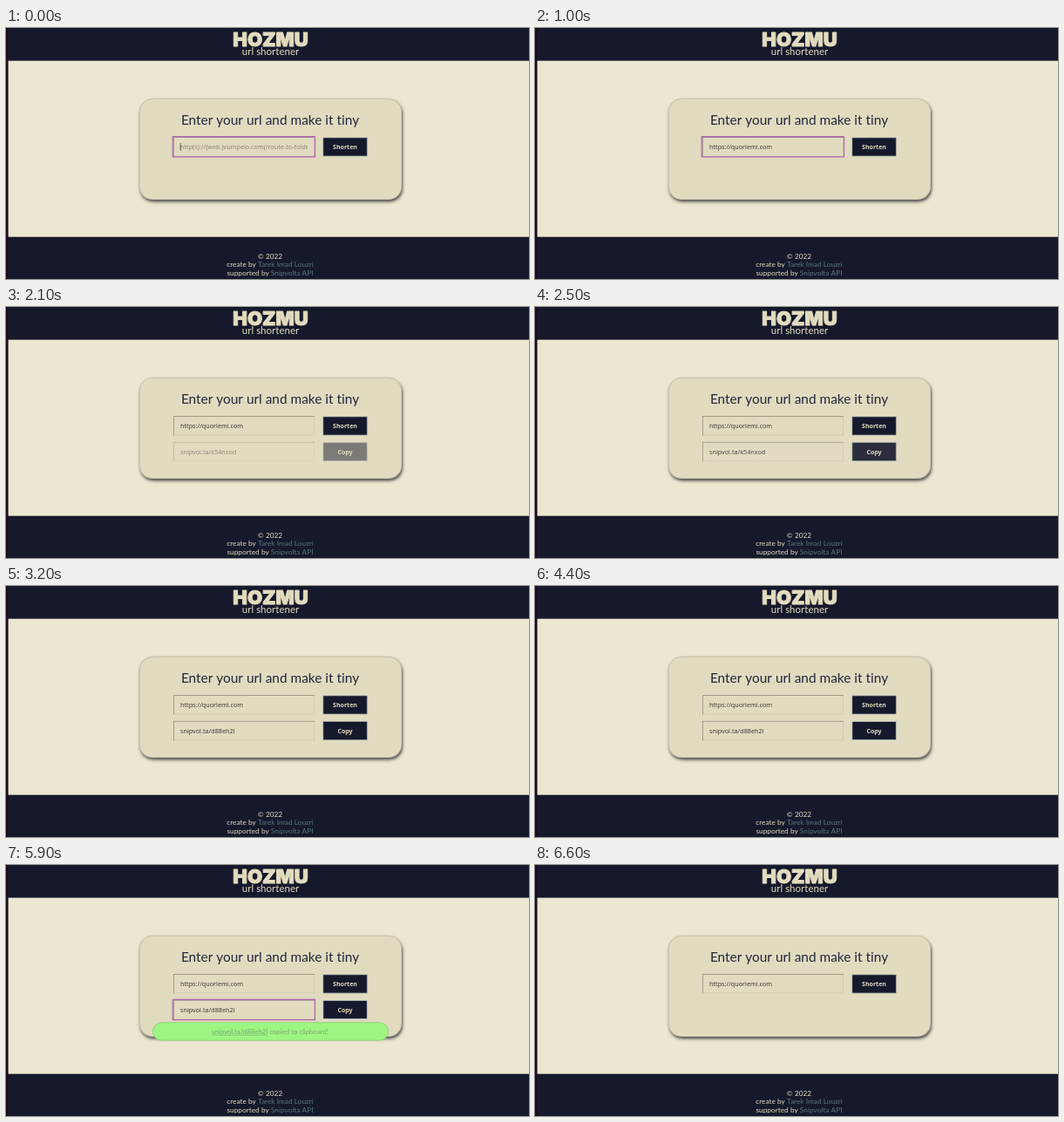
An HTML page with a canvas for the animation above (7300 ms loop, 600 by 288 pixels).

```html
<!DOCTYPE html>
<html lang="en">
<head>
<meta charset="utf-8">
<title>url shortener</title>
<style>
  html, body { margin: 0; width: 100%; height: 100%; overflow: hidden; background: #ece7d0; }
  canvas { display: block; width: 600px; height: 288px; }
</style>
</head>
<body>
<canvas id="stage"></canvas>
<script>
const LOOP = 7300, STEP = 100;
const W = 600, H = 288;
const UI = '"Noto Sans", sans-serif';
const BODY = 'Lato, sans-serif';
const NAVY = '#16192c', SAND = '#ece7d0', CARD = '#e1dbc0', CREAM = '#e2dbbd';
const INK = '#403e38', PURPLE = '#b062b4', TEAL = '#56777c';

const LONG_URL = 'https://quorlemi.com';
const OLD_LINK = 'snipvol.ta/k54nxod';
const NEW_LINK = 'snipvol.ta/d88eh2l';
const HINT = 'http(s)://(web.)vumpelo.com(/route-to-folder';

const canvas = document.getElementById('stage');
const ctx = canvas.getContext('2d');
const scale = window.devicePixelRatio || 1;
canvas.width = W * scale;
canvas.height = H * scale;
ctx.scale(scale, scale);
ctx.letterSpacing = '0.01px'; // switches ligatures off

function rect(x, y, w, h, color) {
  ctx.fillStyle = color;
  ctx.fillRect(x, y, w, h);
}

function pill(x, y, w, h, r, fill, edge) {
  ctx.beginPath();
  ctx.roundRect(x, y, w, h, r);
  ctx.fillStyle = fill;
  ctx.fill();
  if (!edge) return;
  ctx.strokeStyle = edge;
  ctx.lineWidth = 0.8;
  ctx.stroke();
}

function text(str, x, y, font, color, align = 'left') {
  ctx.font = font;
  ctx.fillStyle = color;
  ctx.textAlign = align;
  ctx.fillText(str, x, y);
}

function width(str, font) {
  ctx.font = font;
  return ctx.measureText(str).width;
}

// Centred line made of two coloured parts; returns its left edge.
function pair(a, colorA, b, colorB, cx, y, font) {
  const wa = width(a, font);
  const x = cx - (wa + width(b, font)) / 2;
  text(a, x, y, font, colorA);
  text(b, x + wa, y, font, colorB);
  return x;
}

// Opacity that grows by a tenth every step after its start.
function fade(t, start) {
  if (t < start) return 0;
  return Math.min(1, (Math.floor((t - start) / STEP) + 1) / 10);
}

function header() {
  rect(0, 0, W, 37.6, NAVY);
  text('HOZMU', 303.5, 21, '900 22.2px Inter, sans-serif', CREAM, 'center');
  ctx.strokeStyle = CREAM;
  ctx.lineWidth = 1;
  ctx.lineJoin = 'round';
  ctx.strokeText('HOZMU', 303.5, 21);
  text('url shortener', 303.5, 31, `11.5px ${BODY}`, CREAM, 'center');
}

function footer() {
  const font = `8.3px ${BODY}`;
  rect(0, 239.7, W, 49, NAVY);
  text('© 2022', 303, 265, font, CREAM, 'center');
  pair('create by ', CREAM, 'Tarek Imad Louzri', TEAL, 303, 274, font);
  pair('supported by ', CREAM, 'Snipvolta API', TEAL, 303, 283.5, font);
}

function card() {
  ctx.save();
  ctx.shadowColor = 'rgba(64, 64, 68, 0.9)';
  ctx.shadowBlur = 3.5 * scale;
  ctx.shadowOffsetX = scale;
  ctx.shadowOffsetY = 2.5 * scale;
  pill(153, 81, 301, 116, 15, CARD);
  ctx.restore();
  pill(153.3, 81.2, 300.4, 115.6, 15, CARD, 'rgba(110, 108, 98, 0.3)');
  text('Enter your url and make it tiny', 303, 110.5, `15.4px ${BODY}`, '#23263a', 'center');
}

function field(y, focused) {
  rect(192, y + 21.5, 162, 1, '#d3cdb5');
  rect(353, y, 1, 22.5, '#d3cdb5');
  rect(192, y, 162, 1, '#a19d8a');
  rect(192, y, 1, 22.5, '#a19d8a');
  if (!focused) return;
  ctx.strokeStyle = PURPLE;
  ctx.lineWidth = 1.2;
  ctx.strokeRect(191.2, y - 0.4, 163.3, 23.3);
}

function button(label, y, edge = '#6a7780') {
  rect(363.7, y, 50.8, 21.5, edge);
  rect(364.3, y + 0.7, 49.5, 20, NAVY);
  text(label, 389, y + 13.4, `600 7px ${UI}`, CREAM, 'center');
}

function longRow(t) {
  const font = `7.2px ${UI}`;
  const empty = t < 800;
  field(125, t < 1700);
  ctx.save();
  ctx.beginPath();
  ctx.rect(199, 126, 147, 21);
  ctx.clip();
  text(empty ? HINT : LONG_URL, 200, 139, font, empty ? '#898573' : INK);
  ctx.restore();
  if (t < 1000) {
    const x = empty ? 199.7 : 200.5 + width(LONG_URL, font);
    rect(x, 132, 0.8, 9, INK);
  }
  button('Shorten', 125.7);
}

function shortRow(t) {
  const font = `7.2px ${UI}`;
  const link = t < 3200 ? OLD_LINK : NEW_LINK;
  const picked = t >= 4600 && t < 5900;
  field(154.8, t >= 4600);
  if (picked) rect(199.5, 161.5, width(link, font) + 1, 9.5, PURPLE);
  text(link, 200, 168.7, font, picked ? '#f0e4e0' : INK);
  button('Copy', 155.3, t >= 4400 ? '#8fa5b3' : undefined);
  // A veil in the card colour fades the row as one piece.
  ctx.globalAlpha = 1 - fade(t, 1700);
  rect(190, 152, 227, 28, CARD);
  ctx.globalAlpha = 1;
}

function toast(t) {
  const font = `7.8px ${BODY}`;
  ctx.globalAlpha = fade(t, 4600);
  pill(168.4, 180.8, 270.2, 20.4, 10.2, '#9ff581', '#86cf74');
  const x = pair(NEW_LINK, '#6fa583', ' copied to clipboard!', '#78a86a', 303, 193.7, font);
  rect(x, 194.8, width(NEW_LINK, font), 0.6, '#6fa583');
  ctx.globalAlpha = 1;
}

function draw(t) {
  rect(0, 0, W, H, SAND);
  header();
  footer();
  card();
  longRow(t);
  if (t >= 1700 && t < 6600) shortRow(t);
  if (t >= 4600 && t < 6600) toast(t);
  rect(0, 0, 2.6, H, '#1c0f1d');
}

const begin = performance.now();
function tick() {
  draw((performance.now() - begin) % LOOP);
  requestAnimationFrame(tick);
}
tick();
</script>
</body>
</html>
```
